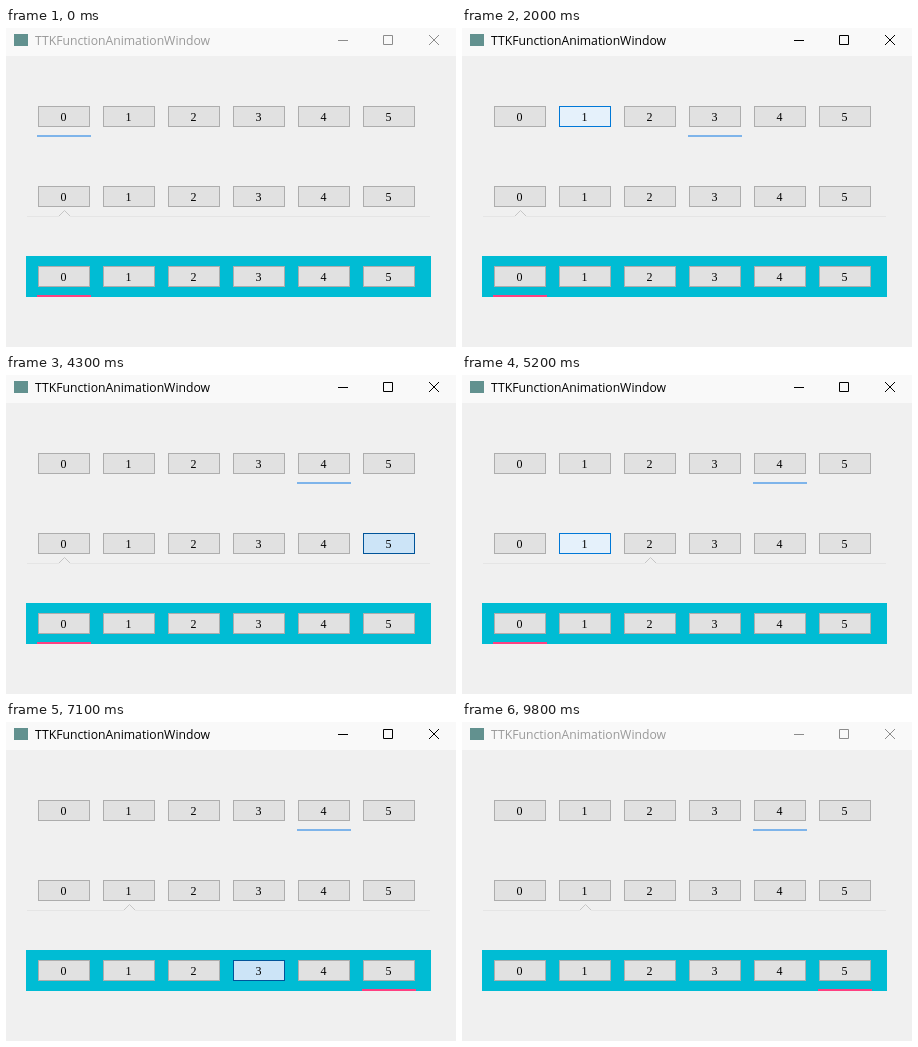
An HTML page for the animation above (9.9 s loop, 450 by 319 pixels).

```html
<!DOCTYPE html>
<html lang="en">
<head>
<meta charset="utf-8">
<title>Function animation window</title>
<style>
  html, body { margin: 0; width: 100%; height: 100%; overflow: hidden; background: #f0f0f0; }
  svg { display: block; }
  .caption { font: 12.2px "Open Sans", "Noto Sans", sans-serif; fill: #000; }
  .controls { fill: none; stroke: #000; }
  .inactive .caption { fill: #999; }
  .inactive .controls { stroke: #8c8c8c; }
  .button rect { fill: #e1e1e1; stroke: #adadad; }
  .button text { font: 12px "Liberation Serif", serif; text-anchor: middle; }
  .button.hover rect { fill: #e5f1fb; stroke: #0078d7; }
  .button.pressed rect { fill: #cce4f7; stroke: #005499; }
  .notch { fill: none; stroke: #c6c6c6; }
  .rule { fill: none; stroke: #e5e5e5; }
</style>
</head>
<body>
<svg id="stage" width="450" height="319" viewBox="0 0 450 319">
  <rect width="450" height="319" fill="#f0f0f0"/>
  <rect width="450" height="28" fill="#f9f9f9"/>
  <rect x="8" y="6" width="14" height="12" fill="#62918f"/>
  <text class="caption" x="29" y="17">TTKFunctionAnimationWindow</text>
  <path class="controls" d="M332 12.5h10M377.5 7.5h9v9h-9zM423 7l10 10M433 7l-10 10"/>
  <rect x="20" y="228" width="405" height="41" fill="#00bcd4"/>
  <g id="buttons"></g>
  <rect id="blueBar" y="107" width="54" height="2" fill="#7eb4ea"/>
  <path id="rule" class="rule"/>
  <path id="notch" class="notch"/>
  <rect id="pinkBar" y="267" width="54" height="2" fill="#ff4081"/>
</svg>
<script>
const LOOP = 9900, STEP = 100, PITCH = 65;
// Every click follows the same rhythm, in ms after the press.
const RELEASE = 80, SLIDE = 42, PRESSED = 100, LEAVE = 180, ARRIVE = 250;
const FIRST_HOVER = 400, FOCUS = 800, BLUR = 9800;

// Per row of buttons: press time and column
const clicks = [
  [[800, 1], [1350, 5], [1700, 3], [2150, 1], [2550, 4]],
  [[3120, 2], [3800, 0], [4300, 5], [4900, 2], [5500, 1]],
  [[6000, 1], [6450, 5], [7100, 3], [7600, 0], [8000, 4], [8400, 1], [8920, 5]]
].flatMap((list, row) => list.map(([start, column]) => ({ row, start, column })));

const byId = id => document.getElementById(id);
const clamp = value => Math.min(1, Math.max(0, value));

function markerAt(row, time) {
  return clicks.filter(click => click.row === row).reduce((position, click) => {
    const progress = clamp((time - click.start - RELEASE) / SLIDE);
    return position + (click.column - position) * progress;
  }, 0);
}

function buttonState(row, column, time) {
  const index = clicks.findIndex((click, i) => {
    const arrival = i ? clicks[i - 1].start + ARRIVE : FIRST_HOVER;
    return time >= arrival && time < click.start + LEAVE;
  });
  const click = clicks[index];
  if (!click || click.row !== row || click.column !== column) return "";
  const elapsed = time - click.start;
  return elapsed >= 0 && elapsed < PRESSED ? "pressed" : "hover";
}

const buttons = [0, 1, 2].flatMap(row => [0, 1, 2, 3, 4, 5].map(column => {
  const x = 32 + PITCH * column, y = 78 + 80 * row;
  const group = document.createElementNS("http://www.w3.org/2000/svg", "g");
  group.innerHTML = `<rect x="${x + 0.5}" y="${y + 0.5}" width="51" height="20"/>
    <text x="${x + 25.5}" y="${y + 15}">${column}</text>`;
  byId("buttons").append(group);
  return { row, column, group };
}));

function draw(now) {
  const time = Math.floor(now % LOOP / STEP) * STEP;
  for (const { row, column, group } of buttons) {
    group.setAttribute("class", "button " + buttonState(row, column, time));
  }
  byId("stage").setAttribute("class", time < FOCUS || time >= BLUR ? "inactive" : "");

  const offset = row => Math.round(PITCH * markerAt(row, time));
  byId("blueBar").setAttribute("x", 31 + offset(0));
  byId("pinkBar").setAttribute("x", 31 + offset(2));

  const center = 58.5 + offset(1);
  byId("rule").setAttribute("d", `M21 188.5H${center - 5.5}M${center + 5.5} 188.5H424`);
  byId("notch").setAttribute("d", `M${center - 5.5} 188l5.5 -5.5l5.5 5.5`);
}

const origin = performance.now();
function tick() {
  draw(performance.now() - origin);
  requestAnimationFrame(tick);
}
tick();
</script>
</body>
</html>
```
